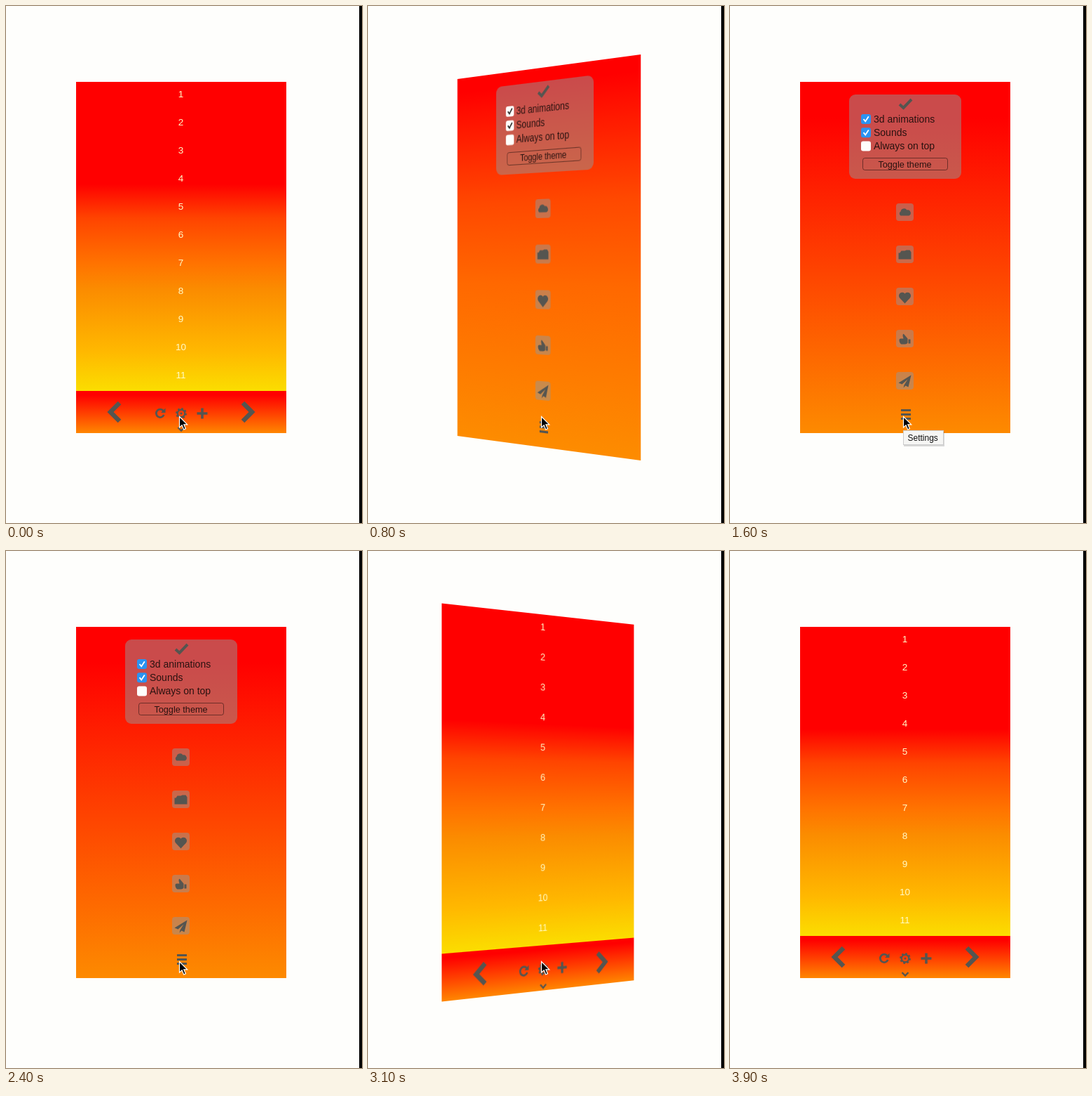
These frames come from a looping animation (508 px wide and 736 px high, 4 s). An HTML page:

```html
<!DOCTYPE html>
<html lang="en">
<head>
<meta charset="utf-8">
<style>
html, body { margin: 0; width: 100%; height: 100%; overflow: hidden; background: #fefefc; }
#stage { position: relative; width: 508px; height: 736px; overflow: hidden;
  box-sizing: border-box; border-right: 4px solid #000; }
svg { position: absolute; font-family: "Liberation Sans", Arial, sans-serif; }
.face { left: 100px; top: 108px; width: 300px; height: 500px; }
#overlay { left: 0; top: 0; }
.icon { fill: #555550; }
.line { fill: none; stroke: #555550; }
.tile { fill: #969696; fill-opacity: .5; }
</style>
</head>
<body>
<div id="stage">
  <svg class="face" id="front" viewBox="0 0 300 500">
    <defs>
      <linearGradient id="list" x2="0" y2="1">
        <stop offset=".33" stop-color="#f00"/>
        <stop offset=".44" stop-color="#ff4400"/>
        <stop offset=".59" stop-color="#ff7400"/>
        <stop offset=".67" stop-color="#fb8c00"/>
        <stop offset=".87" stop-color="#ffb800"/>
        <stop offset="1" stop-color="#fbde00"/>
      </linearGradient>
      <linearGradient id="bar" x2="0" y2="1">
        <stop offset=".1" stop-color="#f00"/>
        <stop offset="1" stop-color="#ff8600"/>
      </linearGradient>
    </defs>
    <rect width="300" height="441" fill="url(#list)"/>
    <rect y="440" width="300" height="60" fill="url(#bar)"/>
    <g id="rows" font-size="13.5" text-anchor="middle" fill="#fffbc8"></g>
    <g class="line">
      <path d="M62 457L49 470L62 483M238 457L251 470L238 483" stroke-width="6.5"/>
      <path d="M124.6 468.4A5.7 5.7 0 1 0 125.3 474" stroke-width="2.8"/>
      <circle cx="150" cy="472" r="5.2" stroke-width="2.4"/>
      <circle cx="150" cy="472" r="6.8" stroke-width="2.2" stroke-dasharray="2.7 2.64"/>
      <path d="M172.5 472H187.5M180 464.5V479.5" stroke-width="3.6"/>
      <path d="M145.5 492L150 496.5L154.5 492" stroke-width="2.4"/>
    </g>
    <path class="icon" d="M127.5 464.5V471H121Z"/>
    <circle class="icon" cx="150" cy="472" r="1.6"/>
  </svg>

  <svg class="face" id="back" viewBox="0 0 300 500">
    <defs>
      <linearGradient id="resting" x2="0" y2="1">
        <stop offset=".1" stop-color="#f00"/>
        <stop offset="1" stop-color="#fd8a00"/>
      </linearGradient>
      <linearGradient id="turning" x2="0" y2="1">
        <stop offset=".04" stop-color="#f00"/>
        <stop offset=".35" stop-color="#ff4800"/>
        <stop offset=".57" stop-color="#ff6800"/>
        <stop offset="1" stop-color="#fd8c00"/>
      </linearGradient>
    </defs>
    <rect id="panel" width="300" height="500"/>
    <rect x="70" y="18" width="160" height="120" rx="9" fill="#969696" fill-opacity=".5"/>
    <path class="line" d="M142 32L147.5 37L159 25" stroke-width="4"/>
    <g id="options" font-size="14" fill="#2a1210"></g>
    <rect x="89.5" y="108.5" width="121" height="17" rx="3" fill="none" stroke="#000" stroke-opacity=".45"/>
    <text x="149.5" y="121.5" font-size="12.7" text-anchor="middle" fill="#2a1210">Toggle theme</text>
    <g id="tiles"></g>
    <path class="line" d="M144 467.5H158M144 473.5H158M144 479.5H158" stroke-width="3.2"/>
  </svg>

  <svg id="overlay" width="504" height="736">
    <g id="tip">
      <rect x="248" y="606" width="58" height="21" fill="#000" opacity=".15"/>
      <rect x="247.5" y="604.5" width="57" height="20" fill="#f6f6f4" stroke="#ccc"/>
      <text x="253.5" y="618.5" font-size="12" fill="#111">Settings</text>
    </g>
    <path id="cursor" d="M0 0V15.5L3.6 12.2L6.2 18.5L8.9 17.3L6.3 11.3H11.2Z" stroke="#fff" stroke-width="1.2"/>
  </svg>
</div>
<script>
const $ = id => document.getElementById(id);

for (let i = 0; i < 11; i++)
  $('rows').innerHTML += `<text x="149.5" y="${21.5 + 40 * i}">${i + 1}</text>`;

['3d animations', 'Sounds', 'Always on top'].forEach((label, i) => {
  const y = 46 + 19.2 * i;
  $('options').innerHTML += `<rect class="${i < 2 ? 'box' : ''}" x="87" y="${y}" width="14" height="14" rx="3" fill="#fefefc"/>` +
    (i < 2 ? `<path class="tick" d="M90.5 ${y + 7}l2.7 3.2l4.6 -7" fill="none" stroke-width="1.8"/>` : '') +
    `<text x="105" y="${y + 12}">${label}</text>`;
});

// Cloud, folder, heart, thumb and paper plane.
[
  'M-6 5A3.5 3.5 0 0 1 -6 -1A5 5 0 0 1 3 -3A4.3 4.3 0 0 1 6 5Z',
  'M-9 -2H-7L-5 -5H0L2 -6H7L9 -3V7H-9Z',
  'M0 10L-7.5 2A4.7 4.7 0 0 1 0 -4A4.7 4.7 0 0 1 7.5 2Z',
  'M-8 2Q-8 0 -6 0H-2L-3 -4Q-3 -8 -1 -6L4 0V6Q3 8 0 8H-5Q-8 6 -8 2ZM5 1H8V7H5Z',
  'M9 -8L-9 3L-4 5L4 -2L-1 6L-2 10L1 7L5 9Z'
].forEach((shape, i) => {
  $('tiles').innerHTML += `<g transform="translate(149.5 ${185.5 + 60 * i})">` +
    `<rect class="tile" x="-12.5" y="-12.5" width="25" height="25" rx="4"/><path class="icon" d="${shape}"/></g>`;
});

const LOOP = 4000, FLIP = 1080, OPEN = 121, CLOSE = 2406;

// Symmetric cubic Bezier that pulls back first and overshoots at the end.
const bezier = (s, a, b) => 3 * s * (1 - s) * ((1 - s) * a + s * b) + s ** 3;
function ease(x) {
  if (x <= 0) return 0;
  if (x >= 1) return 1;
  let lo = 0, hi = 1;
  for (let i = 0; i < 24; i++) {
    const mid = (lo + hi) / 2;
    if (bezier(mid, .425, .575) < x) lo = mid; else hi = mid;
  }
  return bezier(lo, -.4, 1.4);
}

function paint(t) {
  const angle = 180 * (ease((t - OPEN) / FLIP) - ease((t - CLOSE) / FLIP));
  const isFront = angle < 90;
  const turn = isFront ? angle : angle - 180;
  const tilt = Math.abs(turn);
  const lift = tilt * (3.3 - .006 * tilt);
  const face = isFront ? $('front') : $('back');
  $('front').style.display = isFront ? '' : 'none';
  $('back').style.display = isFront ? 'none' : '';
  face.style.transform = tilt ? `perspective(1500px) translateZ(${lift}px) rotateY(${turn}deg)` : 'none';
  $('panel').setAttribute('fill', tilt ? 'url(#turning)' : 'url(#resting)');

  const active = t >= 1200;
  document.querySelectorAll('.box').forEach(e => e.setAttribute('fill', active ? '#2a93f2' : '#fefefc'));
  document.querySelectorAll('.tick').forEach(e => e.setAttribute('stroke', active ? '#fff' : '#222'));

  $('tip').style.display = t >= 1400 && t < 2400 ? '' : 'none';
  const drop = t < 3700 ? 0 : t < 3800 ? 20 : 46;
  $('cursor').setAttribute('transform', `translate(247.5 ${584.5 + drop})`);
  $('cursor').style.display = t < 3900 ? '' : 'none';
}

const start = performance.now();
function tick() {
  paint((performance.now() - start) % LOOP);
  requestAnimationFrame(tick);
}
tick();
</script>
</body>
</html>
```
